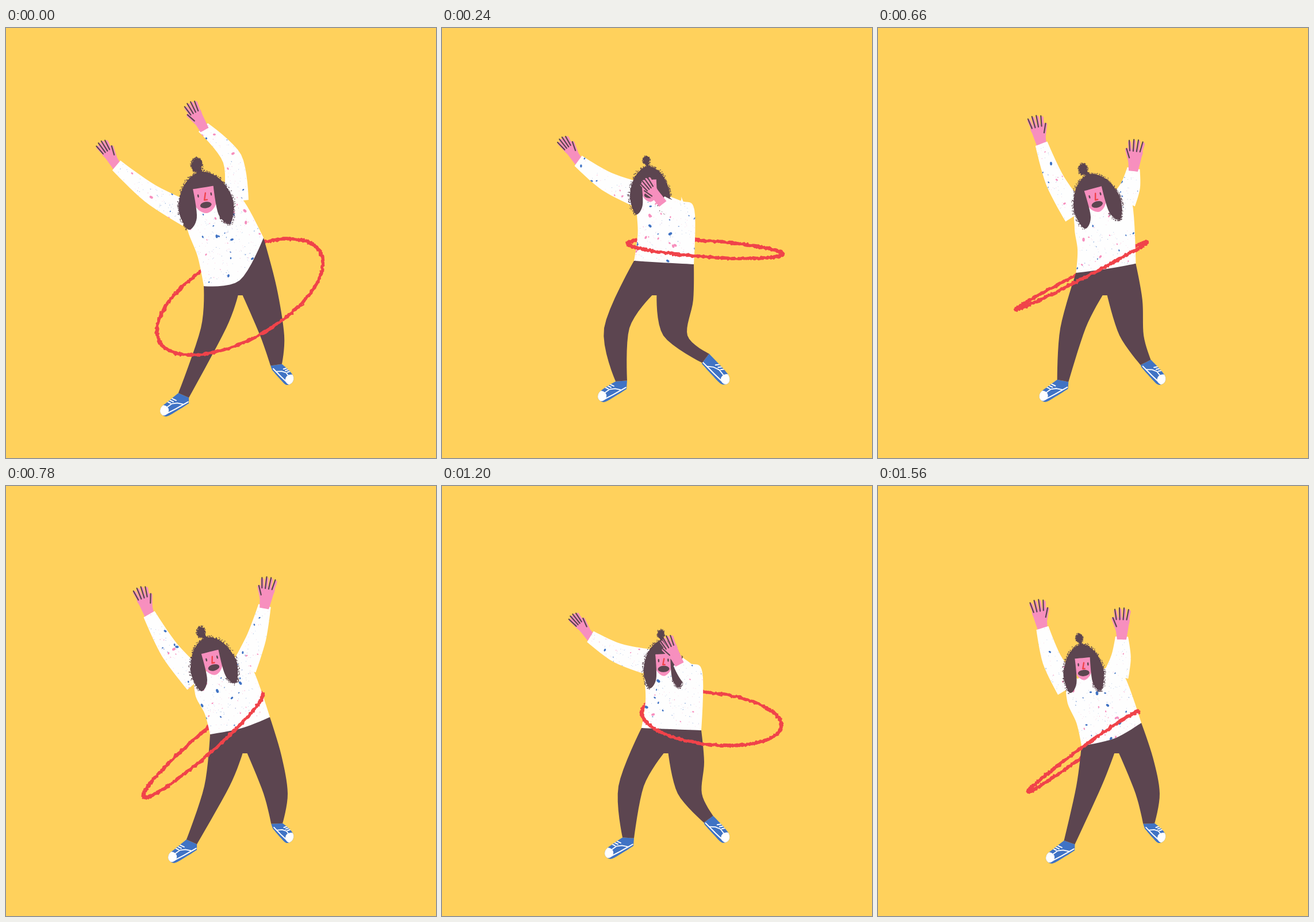
Write an HTML page with a canvas that moves like this. It is 748x748 px and loops after 1.62 s.

```html
<!DOCTYPE html>
<html lang="en">
<head>
<meta charset="utf-8">
<title>Hoop dance</title>
<style>
html, body { margin: 0; height: 100%; overflow: hidden; background: #ffd15c; }
canvas { display: block; width: 100vw; height: 100vh; }
</style>
</head>
<body>
<canvas width="748" height="748"></canvas>
<script>
const STEP = 60, STEPS = 27;
const DARK = '#5c4550', PINK = '#f78fbe', RED = '#f0434a', BLUE = '#4073c4', WHITE = '#fefefe', YELLOW = '#ffd15c';
const ctx = document.querySelector('canvas').getContext('2d');

// Joints that lead the dance; the rest of the body follows from them.
// hips: x, y, rise of the right side; knee: x of the right knee; head: x, y, tilt, width
const dance = [
  { t: 0, hips: [396, 407, 42], knee: [463], ankle: [309, 639], shoulder: [318, 325], wristL: [192, 239], wristR: [343, 173], head: [346, 297, -9, 1.2] },
  { t: 4, hips: [386, 408, -3], knee: [406], ankle: [312, 614], shoulder: [342, 290], wristL: [237, 231], wristR: [381, 302], head: [361, 281, -4, .87] },
  { t: 8, hips: [382, 416, -4], knee: [398], ankle: [320, 606], shoulder: [364, 298], wristL: [321, 188], wristR: [418, 305], head: [405, 284, -11, 1.05] },
  { t: 13, hips: [407, 417, 15], knee: [469], ankle: [323, 619], shoulder: [332, 340], wristL: [249, 223], wristR: [450, 208], head: [359, 306, -14, 1.02] },
  { t: 16, hips: [414, 408, 10], knee: [467], ankle: [331, 618], shoulder: [340, 330], wristL: [219, 288], wristR: [394, 229], head: [366, 312, 9, 1] },
  { t: 20, hips: [399, 423, -2], knee: [431], ankle: [324, 612], shoulder: [356, 305], wristL: [258, 262], wristR: [411, 306], head: [385, 309, -3, .87] },
  { t: 26, hips: [406, 432, 20], knee: [469], ankle: [333, 620], shoulder: [332, 352], wristL: [286, 247], wristR: [424, 262], head: [357, 316, -5, .88] }
];

// centre, radii, tilt in degrees; a negative second radius puts the far side on top
const hoops = [
  [0, 407, 468, 160, 74, -29], [2, 468, 424, 149, 48, -11], [4, 458, 384, 135, 14, 4], [8, 403, 396, 118, 2, -1],
  [13, 343, 451, 137, 18, -41], [16, 452, 442, 148, 82, -24], [20, 469, 405, 122, 45, 6], [26, 357, 462, 118, -7, -36]
].map(([t, ...ring]) => ({ t, ring }));

// Hermite interpolation through unevenly spaced keys
function poseAt(keys, t) {
  let i = keys.findIndex(k => k.t > t) - 1;
  if (i < 0) i = keys.length - 2;
  const a = keys[i], b = keys[i + 1], before = keys[i - 1] || a, after = keys[i + 2] || b;
  const span = b.t - a.t, s = (t - a.t) / span, out = {};
  for (const k in a) if (k !== 't') out[k] = a[k].map((v, j) => hermite(v, b[k][j],
    (b[k][j] - before[k][j]) / (b.t - before.t) * span,
    (after[k][j] - v) / (after.t - a.t) * span, s));
  return out;
}

function hermite(a, b, ta, tb, s) {
  const s2 = s * s, s3 = s2 * s;
  return a + (3 * s2 - 2 * s3) * (b - a) + (s3 - 2 * s2 + s) * ta + (s3 - s2) * tb;
}

const clamp = (v, lo, hi) => Math.min(hi, Math.max(lo, v));
const shift = ([x, y], dx, dy) => [x + dx, y + dy];
const mix = (a, b, s) => [a[0] + (b[0] - a[0]) * s, a[1] + (b[1] - a[1]) * s];
const toward = (a, b) => {
  const d = Math.hypot(b[0] - a[0], b[1] - a[1]) || 1;
  return [(b[0] - a[0]) / d, (b[1] - a[1]) / d];
};

let seed = 1;
const rnd = () => (seed = seed * 16807 % 2147483647) / 2147483647;
const jitter = r => (rnd() + rnd() - 1) * r;

// Closed smooth outline as sampled points; corner indices stay sharp
function outline(knots, corners = []) {
  const n = knots.length, pts = [], at = i => knots[(i + n) % n];
  const tangent = (i, d) => corners.includes(i % n) ? 0 : (at(i + 1)[d] - at(i - 1)[d]) / 2;
  for (let i = 0; i < n; i++)
    for (let s = 0; s < 1; s += .125)
      pts.push([0, 1].map(d => hermite(at(i)[d], at(i + 1)[d], tangent(i, d), tangent(i + 1, d), s)));
  return pts;
}

function trace(pts) {
  ctx.beginPath();
  pts.forEach(p => ctx.lineTo(...p));
}
function fill(pts, color) {
  trace(pts);
  ctx.closePath();
  ctx.fillStyle = color;
  ctx.fill();
}
function stroke(pts, color, width) {
  trace(pts);
  ctx.strokeStyle = color;
  ctx.lineWidth = width;
  ctx.stroke();
}
function oval([x, y], rx, ry, color, turn = 0) {
  ctx.beginPath();
  ctx.ellipse(x, y, rx, ry, turn, 0, 7);
  ctx.fillStyle = color;
  ctx.fill();
}
function fuzz(pts, spread) {
  for (const p of pts)
    for (let i = 0; i < 7; i++) oval(shift(p, jitter(spread), jitter(spread)), .8, .8, DARK);
}

function cloth(pts) {
  fill(pts, WHITE);
  ctx.save();
  ctx.clip();
  for (let i = 0; i < 1200; i++) {
    const r = .4 + 2.4 * rnd() ** 11, color = rnd() < .5 ? PINK : BLUE;
    ctx.globalAlpha = r > 1 ? 1 : .6;
    oval([180 + rnd() * 290, 168 + rnd() * 285], r * 1.3, r * .85, color, rnd() * 6);
  }
  ctx.restore();
}

function sleeve(shoulder, elbow, wrist) {
  const joints = [shoulder, elbow, wrist];
  const side = sign => joints.map((p, i) => {
    const [dx, dy] = toward(joints[Math.max(0, i - 1)], joints[Math.min(2, i + 1)]);
    const half = sign * [22, 17, 11][i];
    return shift(p, -dy * half, dx * half);
  });
  return outline([...side(1), ...side(-1).reverse()], [0, 2, 3, 5]);
}

// The hand bends upwards from the forearm and narrows as it turns sideways
function hand(elbow, [x, y], thumb) {
  const [fx, fy] = toward(elbow, [x, y]), [dx, dy] = toward([0, 0], [fx, fy - .5]);
  const length = 51, w = .95 * Math.max(.3, -dy) ** 1.5;
  const at = (u, v) => [x + dx * u * length - dy * v, y + dy * u * length + dx * v];
  fill(outline([at(-.1, -8), at(.35, -12 * w), at(.62, -12 * w), at(.62, 12 * w), at(.35, 12 * w), at(-.1, 8)], [0, 5]), PINK);
  stroke([at(.22, thumb * 8 * w), at(.6, thumb * 16 * w)], PINK, 6);
  const fingers = [-1.5, -.5, .5, 1.5].map(f => [f * 7 * w, 1 - Math.abs(f) * .05]);
  for (const [v, tip] of fingers) stroke([at(.5, v * .85), at(tip - .07, v * 1.2)], PINK, 5.5);
  for (const [v, tip] of fingers) stroke([at(.58, v * .9 - 1), at(tip, v * 1.2 - 1)], DARK, 2.2);
  stroke([at(.34, thumb * 10 * w), at(.64, thumb * 17 * w)], DARK, 2.2);
}

function shoe(back, front, heel, toe) {
  const [sx, sy] = toward(heel, toe), len = Math.hypot(toe[0] - heel[0], toe[1] - heel[1]);
  const up = Math.sign((front[1] - heel[1]) * sx - (front[0] - heel[0]) * sy);
  const at = (u, v) => shift(heel, sx * len * u - sy * up * v, sy * len * u + sx * up * v);
  fill(outline([back, heel, at(.5, -3), at(.9, -4), at(1.04, 5), at(.94, 14), at(.65, 18), front], [0, 1, 7]), BLUE);
  ctx.save();
  ctx.clip();
  oval(at(.92, 8), 10, 9, WHITE);
  stroke([at(0, 3), at(.5, 1), at(.95, 0)], WHITE, 2);
  stroke([at(.2, 3), at(.36, 9), at(.55, 12), at(.75, 10)], WHITE, 1.8);
  for (const u of [.36, .47, .58]) stroke([at(u, 14), at(u + .1, 20)], WHITE, 2);
  stroke([at(.2, -3), at(.95, -4)], BLUE, 4);
  ctx.restore();
}

function legs(waistL, waistR, hemMid, kneeX, ankleL) {
  const kneeR = [kneeX, 535], kneeL = [kneeX - 102, 522];
  const ankleR = [471 + (kneeX - 468) * .2, 587 + (kneeX - 468) * .2];
  const crotch = [.6 * (kneeX - 51) + .2 * (waistL[0] + waistR[0]) + 2, 465];
  const cuff = (knee, ankle) => {
    const [dx, dy] = toward(knee, ankle);
    return [shift(ankle, -dy * 10, dx * 10), shift(ankle, dy * 10, -dx * 10)];
  };
  const [outL, inL] = cuff(kneeL, ankleL), [inR, outR] = cuff(kneeR, ankleR);
  shoe(inL, outL, shift(ankleL, 9, 14), shift(ankleL, -36, 35));
  shoe(inR, outR, shift(ankleR, -7, 9), [493, 620]);
  fill(outline([
    waistL, shift(kneeL, -22, 0), outL, inL, shift(kneeL, 22, 0), shift(crotch, -4, 0),
    shift(crotch, 4, 0), shift(kneeR, -21, 0), inR, outR, shift(kneeR, 21, 0),
    shift(mix(waistR, kneeR, .5), 15, 0), waistR, shift(hemMid, 0, -8)
  ], [0, 2, 3, 5, 6, 8, 9, 12, 13]), DARK);
}

function head([x, y, tilt, width]) {
  const turn = tilt * Math.PI / 180, height = (1 + width) / 2;
  const at = (u, v, a = turn) => [
    x + u * width * Math.cos(a) - v * height * Math.sin(a),
    y + u * width * Math.sin(a) + v * height * Math.cos(a)];
  fill(outline([at(-16, -20), at(16, -20), at(15, 10), at(0, 23), at(-15, 10)], [0, 1]), PINK);

  const half = [[0, -43], [26, -27], [40, 10], [31, 44], [16, 28], [15, -18]];
  const mirrored = half.slice(1).reverse().map(([u, v]) => [-u, v]);
  const hair = outline([...half, ...mirrored].map(([u, v]) => at(u, v)), [5, 6]);
  const r = 6 * height ** 4, bun = at(0, -55, turn * 1.5);
  stroke([at(0, -38), bun], DARK, r);
  oval(bun, r, r * 1.35, DARK, .3);
  fuzz(Array.from({ length: 24 }, (_, i) => shift(bun, r * Math.cos(i), r * 1.3 * Math.sin(i))), 3);
  fill(hair, DARK);
  fuzz(hair.filter((_, i) => i < 32 || i > 64), 4);

  oval(at(-9, -6), 1.3, 3, DARK, turn);
  oval(at(10, -6), 1.3, 3, DARK, turn);
  stroke([at(2, -9), at(-1, 2), at(3, 2)], RED, 2.4);
  oval(at(0, 10), 10, 5.5, DARK, turn);
}

// Chalky half of the hoop
function hoopHalf([x, y, a, b, deg], from) {
  const c = Math.cos(deg * Math.PI / 180), s = Math.sin(deg * Math.PI / 180);
  for (let pass = 0; pass < 7; pass++) {
    const pts = [];
    for (let i = 0; i <= 90; i++) {
      const q = from + i / 90 * Math.PI, u = a * Math.cos(q), v = b * Math.sin(q);
      pts.push([x + u * c - v * s + jitter(3.4), y + u * s + v * c + jitter(3.4)]);
    }
    stroke(pts, RED, 2.4);
  }
}

function elbowOf(shoulder, wrist, bend, drop) {
  const [dx, dy] = toward(shoulder, wrist);
  return shift(mix(shoulder, wrist, .5), -dy * bend, dx * bend + drop);
}

function draw(step) {
  seed = 977 + step * 7919;
  const p = poseAt(dance, step), { ring } = poseAt(hoops, step);
  const [hipX, hipY, rise] = p.hips, { shoulder, wristL, wristR } = p;
  const waistL = [hipX - 52, hipY + rise], waistR = [hipX + 52, hipY - rise];
  const hemMid = [hipX + rise / 4, hipY + rise * rise / 55];

  // A raised arm lifts its shoulder; a low one folds across the face
  const shoulderR = shift(shoulder, 82, clamp((140 - hipY + wristR[1]) * .75, -24, 24));
  const fold = clamp(1 - (shoulderR[1] - wristR[1]) / 50, 0, 1);
  const elbowL = elbowOf(shoulder, wristL, -7, 0);
  const elbowR = elbowOf(shoulderR, wristR, 4 + .35 * Math.max(0, shoulderR[0] - wristR[0]), 40 * fold);
  const inFront = fold > .3 && shoulderR[0] - p.head[0] > 48;
  const sleeveR = sleeve(shoulderR, elbowR, wristR);

  ctx.fillStyle = YELLOW;
  ctx.fillRect(0, 0, 748, 748);
  ctx.lineCap = ctx.lineJoin = 'round';
  hoopHalf(ring, Math.PI);
  legs(waistL, waistR, hemMid, p.knee[0], p.ankle);
  hand(elbowL, wristL, 1);
  cloth(sleeve(shoulder, elbowL, wristL));
  if (!inFront) cloth(sleeveR);
  const armpit = shift(shoulder, -3, 22);
  cloth(outline([
    waistL, shift(mix(waistL, armpit, .5), 4, 0), armpit, shift(shoulder, 4, -10),
    shift(shoulderR, -10, -14), shift(shoulderR, 15, 2), waistR, hemMid
  ], [0, 6]));
  head(p.head);
  if (inFront) cloth(sleeveR);
  hand(elbowR, wristR, -1);
  hoopHalf(ring, 0);
}

const start = performance.now();
let shown = -1;
function tick() {
  const step = Math.floor((performance.now() - start) / STEP) % STEPS;
  if (step !== shown) draw(shown = step);
  requestAnimationFrame(tick);
}
tick();
</script>
</body>
</html>
```
